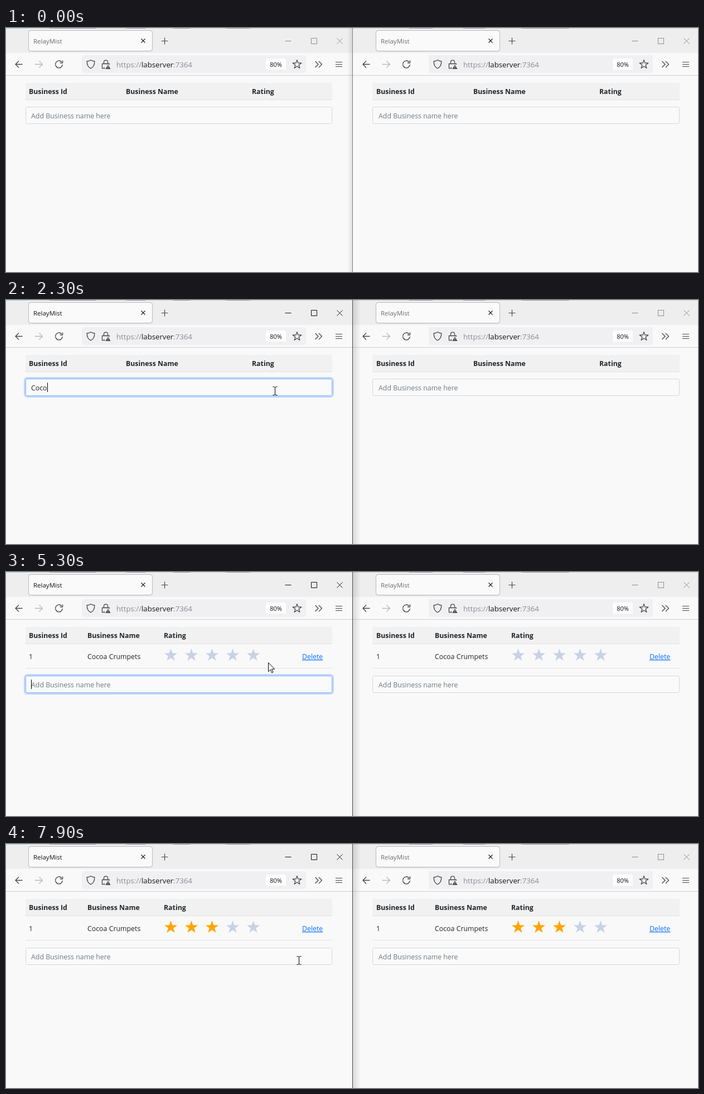
Recreate the animation shown at these times as an HTML page. Size 1241 px wide and 440 px high, loop 8 s.

```html
<!DOCTYPE html>
<html lang="en">
<head>
<meta charset="utf-8">
<title>Live table in two windows</title>
<style>
  html, body { margin: 0; width: 100%; height: 100%; overflow: hidden; background: #f9f9f9; }
  svg { display: block; width: 1241px; height: 440px; font-family: "Open Sans", "Noto Sans", sans-serif; }
  text { white-space: pre; }
</style>
</head>
<body>
<svg id="stage" viewBox="0 0 1241 440"></svg>
<script>
const LOOP = 8000, TICK = 100;
const APP = "RelayMist", HOST = "labserver", PORT = ":7364", NAME = "Cocoa Crumpets";
const INK = "#212529", GRAY = "#c9d1e4", RED = "#e9432e", ORANGE = "#ffa500";
const KEYS = [1600, 1800, 2100, 2200, 2400, 2600, 2800, 3100, 3200, 3300, 3400, 3600, 4000, 4200];
const SUBMIT = 4500, HOVER = 6300, BLUR = 6600, RATED = 6700, LEAVE = 7500;
const CARET_OFF = [[1300, 1600], [3800, 4000], [4800, 5300], [5800, 6300]];

// time, x, y, shape; the point glides to the next entry
const PATH = [
  [100, 1074, 420, "arrow"], [300, 860, 318, "arrow"], [500, 610, 228, "arrow"],
  [700, 474, 182, "arrow"], [800, 482, 164, "beam"], [4500, 480, 163, "arrow"],
  [5200, 480, 163, "arrow"], [5600, 440, 164, "arrow"], [6100, 375, 162, "arrow"],
  [6300, 374, 156, "hand"], [6400, 373, 154, "hand"], [7300, 373, 154, "hand"],
  [7400, 374, 158, "hand"], [7500, 377, 175, "arrow"], [7600, 386, 198, "beam"],
  [7700, 435, 203, "beam"], [7800, 494, 208, "beam"], [7900, 525, 210, "beam"]
];

const CURSORS = {
  arrow: `<path d="M.5.5V16.6L4.2 13.1 6.7 18.7 9 17.7 6.5 12.1H11.8Z" fill="#fff" stroke="#000" stroke-linejoin="round"/>`,
  beam: `<path d="M-3.5-7.5H-1.5L.5-6.5 2.5-7.5H4.5M-3.5 7.5H-1.5L.5 6.5 2.5 7.5H4.5M.5-6.5V6.5" fill="none" stroke="#000"/>`,
  hand: `<path d="M-1.5 1.5C-1.5-.6 1.5-.6 1.5 1.5V8C2-.0 5 7 5 8.6 5.6 7.6 8 7.9 8.1 9.6 9 8.8 11 9.4 11 11V17.5C11 19.5 9 20.5 8.8 24H.3C0 20.5-3.4 18-6 13.4-7.5 11-4.5 9.8-3 11.5L-1.5 13.5Z" fill="#fff" stroke="#000" stroke-linejoin="round"/><path d="M1.5 8V12M5 8.6V12.5M8 9.6V13" stroke="#000"/>`
};

const stage = document.getElementById("stage");
const pen = document.createElement("canvas").getContext("2d");

const rect = (x, y, w, h, fill, more = "") =>
  `<rect x="${x}" y="${y}" width="${w}" height="${h}" fill="${fill}" ${more}/>`;
const line = (d, color = "#45454c", width = 1.2) =>
  `<path d="${d}" fill="none" stroke="${color}" stroke-width="${width}" stroke-linejoin="round"/>`;
const label = (x, y, s, size = 12.35, fill = INK, more = "") =>
  `<text x="${x}" y="${y}" font-size="${size}" fill="${fill}" ${more}>${s}</text>`;
const shift = (x, y, body) => `<g transform="translate(${x} ${y})">${body}</g>`;

function starPoints(cx, cy, r) {
  return Array.from({ length: 10 }, (_, i) => {
    const a = i * Math.PI / 5, q = i % 2 ? r * 0.4 : r;
    return (cx + q * Math.sin(a)).toFixed(2) + "," + (cy - q * Math.cos(a)).toFixed(2);
  }).join(" ");
}

function textWidth(s) {
  pen.font = '12.35px "Open Sans", "Noto Sans", sans-serif';
  return pen.measureText(s).width;
}

function tabStrip(active) {
  return rect(40, 4, 223, 38.5, "#000", 'rx="4.5" opacity=".1"')
    + rect(40.5, 4.5, 222, 37, "#fafafa", 'rx="4" stroke="#b9b9bc"')
    + label(49, 28, APP, 11.5, active ? "#15141a" : "#6c6c70")
    + line("M242.5 19.5l7 7m0-7l-7 7", "#222", 1.2)
    + line("M278.5 23.5h12m-6-6v12", "#45454c", 1.2)
    + line("M29.5 65.5H17m6-6l-6 6 6 6", "#45454c", 1.3)
    + line("M52 65.5h13.5m-6-6l6 6-6 6", "#b9b9bd", 1.3)
    + line("M99.8 61.2A6.4 6.4 0 1 0 101.4 66M101.5 58.5V63H97", "#45454c", 1.4);
}

function urlBar(active) {
  const btn = active ? "#111" : "#8b8b8d";
  return line("M500.5 23.5h11", btn, 1) + line("M547.5 18.5h10v10h-10z", btn, 1)
    + line("M593.5 18.5l10 10m0-10l-10 10", btn, 1)
    + rect(136, 49, 402, 32, "#f0f0f3", 'rx="4"')
    + line("M152 57.8C154.2 59.5 156.5 60 158.8 60 159 66.5 157 70.5 152 73 147 70.5 145 66.5 145.2 60 147.5 60 149.8 59.5 152 57.8Z", "#45454c", 1.3)
    + line("M178 72.5H172.5V64.5H185.5V66M175.5 64.5V61.5C175.5 57 182.5 57 182.5 61.5V64.5", "#45454c", 1.3)
    + `<path d="M183 66L187.5 74H178.5Z" fill="#45454c"/>` + line("M183 68.5v2.5m0 .8v1", "#f0f0f3", 1)
    + `<text x="198" y="71" font-size="13.2" fill="#8a8a93">https://<tspan fill="#15141a">${HOST}</tspan>${PORT}</text>`
    + rect(466, 55, 36, 20.5, "#fcfcfc", 'rx="3"')
    + label(484, 70, "80%", 11, "#15141a", 'text-anchor="middle"')
    + `<polygon points="${starPoints(522, 65.8, 8.2).replace(/ /g, " ")}" fill="none" stroke="#45454c" stroke-width="1.3" stroke-linejoin="round"/>`
    + line("M554.5 60l5.5 5.5-5.5 5.5M561 60l5.5 5.5-5.5 5.5", "#45454c", 1.3)
    + line("M591 61.5h12m-12 4h12m-12 4h12", "#45454c", 1.1);
}

function table(s, dx, stars) {
  const cols = s.row ? [41, 146, 283] : [41, 215, 441];
  const heads = ["Business Id", "Business Name", "Rating"];
  let out = rect(35, 99, 550 + dx, 30, "#f1f1f1") + rect(35, 129, 550 + dx, 1, "#dfe1e3");
  out += cols.map((x, i) => label(x + dx, 119, heads[i], 12.3, INK, 'font-weight="700"')).join("");
  if (!s.row) return out;
  out += label(41 + dx, 157, "1") + label(146 + dx, 157, NAME)
    + label(531 + dx, 157, "Delete", 12.35, "#0d6efd", 'text-decoration="underline"')
    + rect(35, 173, 550 + dx, 1, "#dfe1e3");
  for (let i = 0; i < 5; i++)
    out += `<polygon points="${starPoints(295.5 + 37 * i + dx, 150.2, 12.2)}" fill="${i < 3 ? stars : GRAY}"/>`;
  return out;
}

function field(s, dx, typed, focus, caret) {
  const y = s.row ? 187 : 142, w = 550 + dx;
  let out = "";
  if (focus) out += rect(33.5, y - 1.5, w + 3, 34, "none", `rx="5" stroke="#0d6efd" stroke-width="3" opacity="${0.25 * focus}"`);
  out += rect(35.5, y + 0.5, w - 1, 30, "#fafafa", `rx="3" stroke="${focus ? "#86b7fe" : "#d2d6da"}"`);
  out += typed ? label(45 + dx, y + 21, typed) : label(45 + dx, y + 21, "Add Business name here", 12.35, "#707a83");
  if (caret) out += rect(Math.round(45 + textWidth(typed)), y + 7, 1, 17, "#000");
  return out;
}

function browser(s, x, dx, active, body) {
  return shift(x, 0, rect(0, 0, 622, 440, "#f9f9f9") + rect(0, 0, 622, 45, "#eeeeee")
    + rect(0, 85, 622, 1, "#cfcfd2")
    + shift(dx, 0, tabStrip(active)) + urlBar(active) + body);
}

function topEdge() {
  const spans = [[78, 84], [215, 36], [300, 30], [395, 43], [723, 42], [820, 40], [925, 85]];
  return rect(0, 0, 1241, 1, "#cfd2d8") + rect(0, 0, 40, 1, "#a9cbe2")
    + spans.map(([x, w]) => rect(x, 0, w, 1, "#8e93a2")).join("");
}

function divider(active) {
  const [x, w, from, to] = active ? [622, 14, 0.13, 0] : [612, 9, 0, 0.1];
  return `<defs><linearGradient id="shade"><stop offset="0" stop-opacity="${from}"/><stop offset="1" stop-opacity="${to}"/></linearGradient></defs>`
    + rect(x, 0, w, 440, "url(#shade)") + rect(621, 0, 1, 440, active ? "#4c4c4c" : "#808080");
}

function pointer(t) {
  if (t < PATH[0][0]) return "";
  const i = PATH.findLastIndex(p => p[0] <= t);
  const a = PATH[i], b = PATH[i + 1] || a;
  // the long rest over the field holds still until the row arrives
  const k = b === a || a[0] === 800 ? 0 : (t - a[0]) / (b[0] - a[0]);
  return shift(Math.round(a[1] + (b[1] - a[1]) * k), Math.round(a[2] + (b[2] - a[2]) * k), CURSORS[a[3]]);
}

function draw(t) {
  const s = { row: t >= SUBMIT };
  const active = t >= 800;
  const typed = s.row ? "" : NAME.slice(0, KEYS.filter(k => k <= t).length);
  const focus = t === 900 || t === BLUR ? 0.5 : t > 900 && t < BLUR ? 1 : 0;
  const caret = t >= 1000 && t < BLUR && !CARET_OFF.some(([a, b]) => t >= a && t < b);
  const mine = t < HOVER ? GRAY : t < LEAVE ? RED : ORANGE;
  const theirs = t < RATED ? GRAY : ORANGE;
  stage.innerHTML =
    browser(s, 0, 0, active, table(s, 0, mine) + field(s, 0, typed, focus, caret))
    + browser(s, 622, 1, false, table(s, 1, theirs) + field(s, 1, "", 0, false))
    + topEdge() + divider(active) + pointer(t);
}

let last = -1;
function frame() {
  const t = Math.floor(performance.now() % LOOP / TICK) * TICK;
  if (t !== last) draw(last = t);
  requestAnimationFrame(frame);
}
frame();
</script>
</body>
</html>
```
